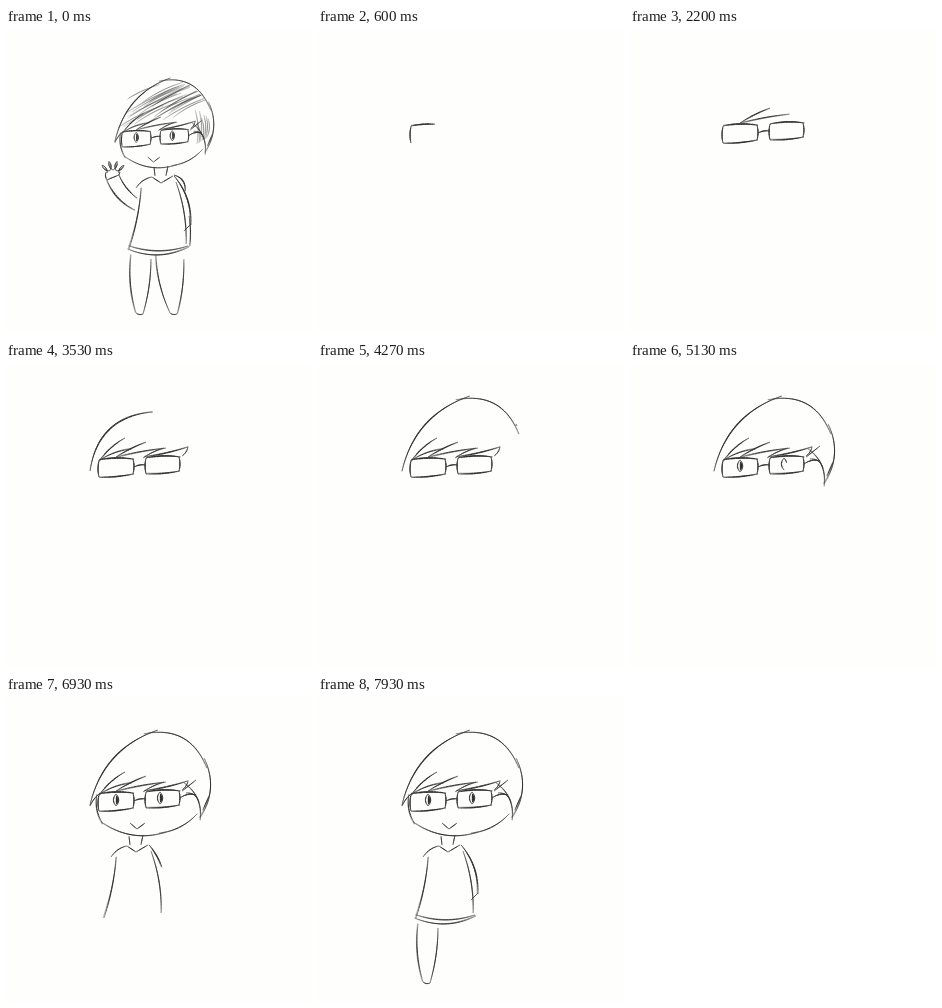
Animation, 306 px wide and 306 px high, one loop 8000 ms. Source, as an HTML page with a canvas:

```html
<!DOCTYPE html>
<html lang="en">
<head>
<meta charset="utf-8">
<title>Sketching a figure</title>
<style>
html, body { margin: 0; width: 100%; height: 100%; overflow: hidden; background: #fefefc; }
canvas { display: block; width: 100vw; height: 100vh; }
</style>
</head>
<body>
<canvas id="stage" width="306" height="306"></canvas>
<script>
const ctx = document.getElementById('stage').getContext('2d');
const SIZE = 306, LOOP = 8000, FPS = 15, INTRO = 200, REDRAW = 3660;
const random = n => { const v = Math.sin(n * 12.9898) * 43758.5453; return v - Math.floor(v); };

// A bent line; a positive bulge bends to the left of its direction
const arc = (x0, y0, x1, y1, bulge = 0, width = 1) =>
  ({ x0, y0, x1, y1, bulge, width, length: Math.hypot(x1 - x0, y1 - y0) });

function pointOn({ x0, y0, x1, y1, bulge, length }, u) {
  const bend = 4 * u * (1 - u) * bulge / length;
  return [x0 + (x1 - x0) * u + (y1 - y0) * bend, y0 + (y1 - y0) * u - (x1 - x0) * bend];
}

// Two tapered passes, the second slightly off the first
function pencil(stroke, progress = 1) {
  const steps = Math.ceil(6 + stroke.length / 5);
  const slip = Math.min(1, stroke.length / 40);
  for (let pass = 0; pass < 2; pass++) {
    const wobble = n => pass * slip * (random(stroke.x0 + stroke.y1 * n) * 2 - 1);
    for (let i = 0; i < steps; i++) {
      const taper = Math.sin(Math.PI * (i + 0.5) / steps);
      ctx.lineWidth = stroke.width * (0.4 + 0.6 * taper) * (1 - 0.35 * pass);
      ctx.beginPath();
      for (const u of [i / steps, (i + 1) / steps]) {
        const [x, y] = pointOn(stroke, u * progress);
        ctx.lineTo(x + wobble(1) * (1 - u) + wobble(2) * u, y + wobble(3) * (1 - u) + wobble(4) * u);
      }
      ctx.stroke();
    }
  }
}

const lens = (x, y, w, h) => [
  arc(x, y + 1, x, y + h, -1, 1.3),
  arc(x, y + 1, x + w, y, 1.5, 1.6),
  arc(x + w - 1, y, x + w - 1, y + h - 3, 1, 1.3),
  arc(x, y + h, x + w, y + h - 3, -1, 1.4)];

const eye = (x, y) => [
  arc(x, y - 6, x, y + 6, -2.6),
  arc(x, y - 6, x, y + 6, 2.6),
  arc(x + 0.5, y - 4, x + 0.5, y + 4, 0.5, 2.4)];

const leg = (left, ankle, right) => [
  arc(left, 228, ankle, 286, -3),
  arc(ankle, 286, ankle + 7, 287, -1),
  arc(ankle + 7, 287, right, 232, -2)];

const leftLens = lens(93, 97, 35, 18);
const rightLens = [arc(128, 105, 140, 103, 1, 1.3), ...lens(140, 95, 34, 17)];
const fringe = [
  arc(110, 95, 140, 80, 1, 1.2),
  arc(110, 95, 160, 86, 1),
  arc(93, 99, 119, 76, 2, 1.2),
  arc(94, 98, 126, 87, 2),
  arc(137, 96, 158, 86, 1),
  arc(138, 95, 182, 85, -1, 1.2),
  arc(182, 85, 176, 94, 1)];
const firstTry = [arc(84, 109, 147, 50, 17, 1.4)];
const outline = [
  arc(84, 109, 152, 34, 14, 1.3),
  arc(138, 38, 201, 72, 15),
  arc(198, 62, 194, 122, 8.5)];
const features = [
  arc(203, 100, 197, 114),
  arc(178, 87, 194, 124, 6),
  arc(176, 95, 190, 84),
  arc(174, 102, 190, 99, 2, 1.2),
  arc(180, 97, 193, 106, 3),
  ...eye(110, 104), ...eye(154, 102),
  arc(84, 110, 94, 97, 1),
  arc(91, 98, 97, 128, -3)];
const chin = [
  arc(95, 126, 160, 136, -8),
  arc(153, 137, 191, 118, -4),
  arc(124, 127, 131, 133),
  arc(131, 133, 139, 127)];
const neck = [arc(123, 140, 124, 149), arc(137, 139, 135, 149)];
const torso = [
  arc(121, 150, 130, 156),
  arc(130, 156, 142, 149),
  arc(121, 150, 105, 161, -2),
  arc(110, 161, 98, 222, 2, 1.1),
  arc(145, 155, 155, 217, 3),
  arc(143, 149, 160, 198, 5, 1.4)];
const hem = [
  arc(160, 197, 153, 204),
  arc(98, 219, 157, 219, -5),
  arc(97, 222, 158, 220, -7)];

const body = [...neck, ...torso, ...hem, ...leg(100, 105, 120)];
const head = [leftLens, rightLens, fringe, outline, features, chin].flat();

// Strokes of a group follow each other at an even pen speed
const sketch = [];
function schedule(from, to, strokes, until = LOOP) {
  const pace = (to - from) / strokes.reduce((sum, s) => sum + s.length, 0);
  for (const stroke of strokes) {
    sketch.push({ stroke, from, time: stroke.length * pace, until });
    from += stroke.length * pace;
  }
}
schedule(200, 1200, leftLens);
schedule(1200, 1900, rightLens);
schedule(1900, 2730, fringe);
schedule(2770, 3530, firstTry, REDRAW);
schedule(REDRAW, 4470, outline);
schedule(4470, 5400, features);
schedule(5400, 5930, [...chin, ...neck]);
schedule(5930, 7070, torso);
schedule(7070, 7930, [...hem, ...leg(100, 105, 120)]);

function placed(dx, dy, sx, sy, draw) {
  ctx.save();
  ctx.translate(dx, dy);
  ctx.scale(sx, sy);
  draw();
  ctx.restore();
}

function hatchHair() {
  ctx.save();
  ctx.beginPath();
  ctx.ellipse(160, 101, 48, 50, 0, 0, 7);
  ctx.clip();
  for (let i = 0; i < 24; i++) {
    const x = 112 + i * 2.4, y = 100 - random(i) * 26, reach = 35 + random(i + 50) * 35;
    pencil(arc(x, y, x + reach, y - reach * 0.5, 2, 0.4));
  }
  for (let i = 0; i < 7; i++) {
    const x = 191 + i * 2.2;
    pencil(arc(x - 2, 82 + random(i) * 14, x - i * 0.6, 116 - i, 2, 0.4));
  }
  ctx.restore();
}

function wavingHand(x, y) {
  for (let i = 0; i < 4; i++) {
    const angle = -0.75 + 0.5 * i;
    for (const side of [-0.24, 0.24]) {
      const at = (r, a) => [x + r * Math.sin(a), y - r * Math.cos(a)];
      pencil(arc(...at(7, angle + side), ...at(16, angle), side * 7));
    }
  }
  pencil(arc(x - 6, y + 3, x - 7, y - 5, 1));
  pencil(arc(x + 6, y - 2, x + 7, y - 5));
  pencil(arc(x - 6, y + 3, x + 6, y - 2));
  pencil(arc(x - 6, y + 3, x + 22, y + 33, -4, 1.2));
  pencil(arc(x + 6, y - 2, x + 24, y + 21, -2, 1.2));
}

function wavingFigure() {
  hatchHair();
  placed(40, 21, 0.82, 0.85, () => head.forEach(s => pencil(s)));
  placed(25, -1, 1, 1, () => [...body, ...leg(125, 139, 153)].forEach(s => pencil(s)));
  pencil(arc(168, 147, 179, 163, 4, 1.3));
  pencil(arc(183, 188, 184, 218, 1));
  wavingHand(107, 149);
}

function render(now) {
  const time = Math.floor((now % LOOP) * FPS / 1000 + 0.05) * 1000 / FPS;
  ctx.fillStyle = '#fefefc';
  ctx.fillRect(0, 0, SIZE, SIZE);
  ctx.strokeStyle = '#303030';
  if (time < INTRO - 1) return wavingFigure();
  for (const { stroke, from, time: span, until } of sketch) {
    const progress = Math.min(1, (time - from) / span);
    if (progress > 0 && time < until) pencil(stroke, progress);
  }
}

const start = performance.now();
(function frame() {
  render(performance.now() - start);
  requestAnimationFrame(frame);
})();
</script>
</body>
</html>
```
